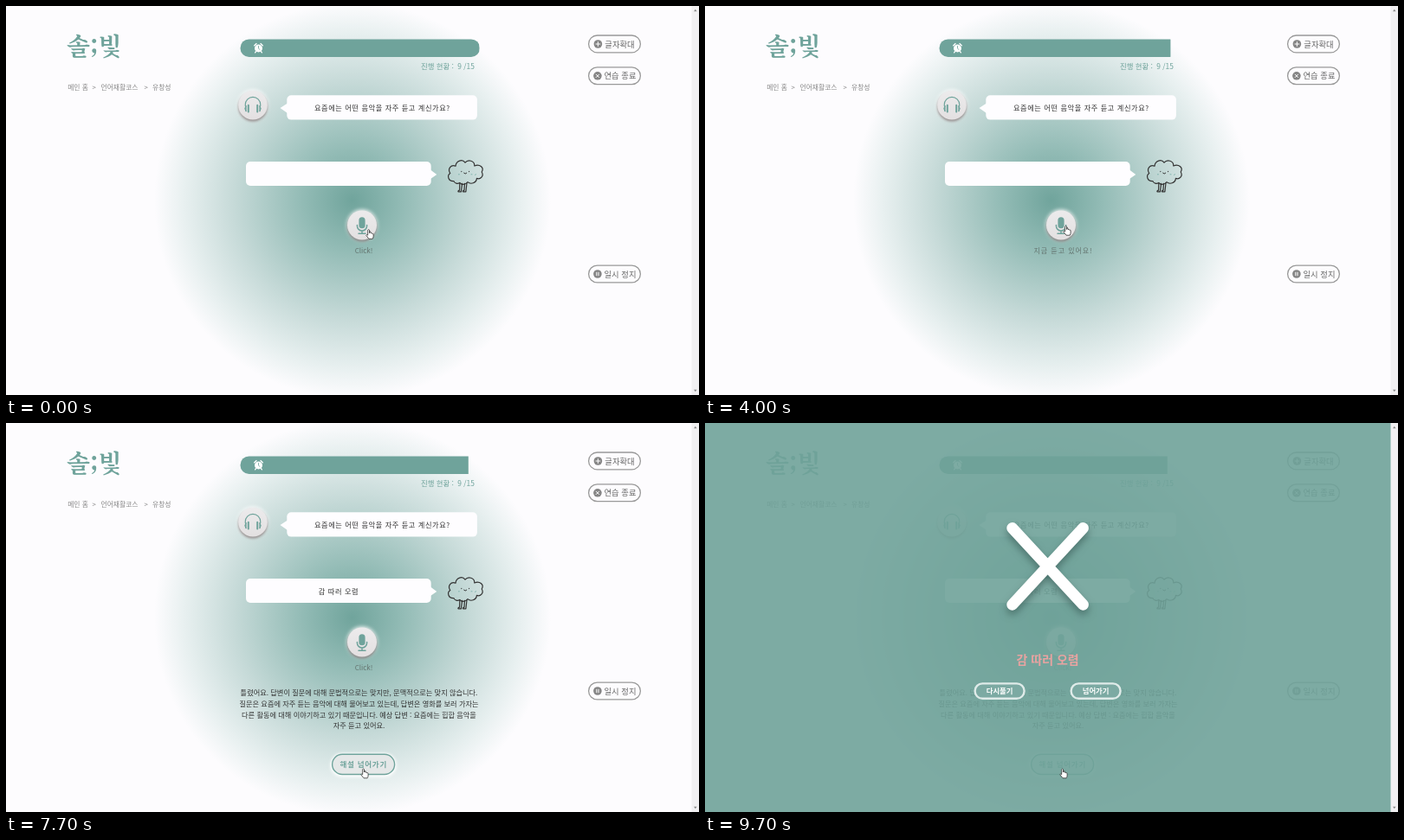
An HTML page that plays this animation: 800 by 450 pixels, repeating every 9.8 s.

```html
<!DOCTYPE html>
<html lang="ko">
<head>
<meta charset="utf-8">
<title>연습</title>
<style>
html, body { margin: 0; width: 100%; height: 100%; overflow: hidden; background: #fdfcfe; }
svg { display: block; width: 800px; height: 450px; }
text { font: 8.2px "Noto Sans CJK KR", "Noto Sans CJK", "Noto Sans KR", sans-serif; fill: #333; }
.mid { text-anchor: middle; }
.wide { letter-spacing: .58px; }
.logo { font: 700 28px "Noto Serif CJK KR", "Noto Serif KR", "Noto Sans CJK KR", serif; fill: #6fa39b; }
.crumb text { font-size: 7.8px; fill: #888; }
.count text { font-size: 8.4px; fill: #6fa39b; }
.side text { font-size: 9.35px; fill: #666; }
.side rect { fill: #fdfcfe; stroke: #999; stroke-width: 1.3; }
.hint { font-size: 8px; fill: #647570; }
.skip { font-size: 8.5px; font-weight: 700; letter-spacing: .75px; fill: #6fa39b; }
.wrong { font-size: 14px; font-weight: 700; fill: #e9a3a1; }
.choice text { font-size: 8.4px; font-weight: 700; fill: #fff; }
.choice rect { fill: #7caaa3; stroke: #dfebe9; stroke-width: 2.4; }
.line { fill: none; stroke-linecap: round; stroke-linejoin: round; }
.raised { filter: drop-shadow(0 2px 1.4px rgba(112, 98, 98, .7)) drop-shadow(0 -1px 2px rgba(255, 255, 255, .9)); }
.glow { filter: drop-shadow(0 1px 2px #fff) drop-shadow(0 0 1px #fff); }
#cross { filter: drop-shadow(0 5px 4px rgba(40, 70, 65, .5)); }
</style>
</head>
<body>
<svg viewBox="0 0 800 450">
  <defs>
    <radialGradient id="halo">
      <stop offset="0" stop-color="#70a49c"/>
      <stop offset=".25" stop-color="#92bbb5"/>
      <stop offset=".6" stop-color="#c6dad8"/>
      <stop offset=".85" stop-color="#e8f0f0"/>
      <stop offset="1" stop-color="#fdfcfe"/>
    </radialGradient>
    <linearGradient id="knob" x2="0" y2="1">
      <stop offset="0" stop-color="#ecebec"/>
      <stop offset="1" stop-color="#e3e0e1"/>
    </linearGradient>
    <clipPath id="track"><rect x="270.5" y="38.4" width="276.5" height="20.6" rx="10"/></clipPath>
  </defs>

  <rect width="800" height="450" fill="#fdfcfe"/>
  <circle cx="400" cy="225" r="229" fill="url(#halo)"/>

  <text class="logo" x="70" y="57">솔;빛</text>
  <g class="crumb">
    <text x="71.2" y="97">메인 홈</text><text x="99.5" y="97">&gt;</text>
    <text x="109.5" y="97">언어재활코스</text><text x="159.5" y="97">&gt;</text>
    <text x="169" y="97">유창성</text>
  </g>

  <rect id="bar" x="270" y="38" width="276" height="22" fill="#6fa39b" clip-path="url(#track)"/>
  <g class="line" stroke="#fff" stroke-width="1.3">
    <path d="M286.7 45.7L289 43.5M296.3 45.7L294 43.5M288.6 52.6L287.6 53.9M294.4 52.6L295.4 53.9"/>
    <circle cx="291.5" cy="48.9" r="4.5" fill="#fff" stroke="none"/>
    <path d="M291.5 46.4V49.1L293 50.4" stroke="#6fa39b" stroke-width=".8"/>
  </g>
  <g class="count"><text x="479" y="73.2">진행 현황 :</text><text x="521.3" y="73.2">9 /15</text></g>

  <g fill="#fefdff">
    <path d="M325 112.5L316.5 118L325 124Z"/>
    <rect x="324.3" y="103.3" width="219.6" height="28.3" rx="5"/>
    <path d="M490 189.5L497.3 195L490 200Z"/>
    <rect x="277" y="180" width="213.7" height="28" rx="5"/>
  </g>
  <text class="wide" x="356" y="121">요즘에는 어떤 음악을 자주 듣고 계신가요?</text>
  <text class="wide" id="answer" x="360.8" y="197.6">감 따러 오렴</text>

  <circle class="raised" cx="285" cy="114.7" r="16.8" fill="url(#knob)"/>
  <g class="line" stroke="#6fa39b">
    <path d="M276.3 115.5V114A8.7 8.7 0 0 1 293.7 114V115.5" stroke-width="1.2"/>
    <path d="M279.8 114.8V122.6M290.2 114.8V122.6" stroke-width="2"/>
    <path d="M276.9 115.6Q274.6 118.7 276.9 121.8ZM293.1 115.6Q295.4 118.7 293.1 121.8Z" fill="#6fa39b"/>
  </g>

  <circle class="raised" cx="411" cy="253.5" r="17" fill="url(#knob)"/>
  <rect x="407.4" y="244.3" width="7.2" height="13" rx="3.6" fill="#6fa39b"/>
  <path class="line" d="M405.4 253.4V254.4A5.6 5.6 0 0 0 416.6 254.4V253.4M411 260V263M407 263.2H415" stroke="#6fa39b" stroke-width="1.5"/>
  <text class="mid hint" id="hint" y="285.6"></text>

  <g class="line" stroke="#333" stroke-width="1.2">
    <path d="M523.8 205L523.6 213.2Q521.4 213.6 522 214.8H525.4L526.6 205.4M529.4 205.4L529 213.2Q526.9 213.6 527.5 214.8H530.9L532 204.8"/>
    <path d="M517 202.6C510.5 203.2 508.8 196 512.8 193.6C509.4 188.6 513.6 183 519 185.2C519.6 178.6 527 176.8 530 181.2C533.6 177 541 179 540.8 185C546.6 182.2 552.4 187 549.2 192C552.2 197 547.4 201 543.4 199.4C543 205 536.4 206.8 533 203.6C530 207.4 525.4 207 523.8 204.4C521.2 206.2 518 205.2 517 202.6Z"/>
    <path d="M525.8 191.3v.4M534.6 191.3v.4M528.6 193.2Q530.2 195.2 531.8 193.2" stroke-width="1"/>
    <path d="M522.4 194.8h1M537 194.8h1M541.5 195.4l1-.7" stroke="#7fb5ad" stroke-width="1"/>
  </g>

  <g class="side">
    <g><rect x="672.6" y="34" width="59.8" height="19.8" rx="9.9"/><text x="691.3" y="47.6">글자확대</text></g>
    <g><rect x="672.6" y="70.8" width="59.8" height="19.8" rx="9.9"/><text x="690.5" y="84.4">연습 종료</text></g>
    <g><rect x="672.6" y="300.1" width="59.8" height="19.8" rx="9.9"/><text x="690.5" y="313.6">일시 정지</text></g>
    <g fill="#858585"><circle cx="683.4" cy="44" r="4.8"/><circle cx="682.9" cy="80.8" r="4.8"/><circle cx="682.9" cy="310" r="4.8"/></g>
    <path class="line" d="M681 44h4.8M683.4 41.6v4.8M681.2 79.1l3.4 3.4M684.6 79.1l-3.4 3.4M681.8 308.2v3.6M684 308.2v3.6" stroke="#fff"/>
  </g>

  <g id="notes">
    <g class="mid">
      <text x="407.5" y="315.3">틀렸어요. 답변이 질문에 대해 문법적으로는 맞지만, 문맥적으로는 맞지 않습니다.</text>
      <text x="407.5" y="327.9">질문은 요즘에 자주 듣는 음악에 대해 물어보고 있는데, 답변은 영화를 보러 가자는</text>
      <text x="407.5" y="340.5">다른 활동에 대해 이야기하고 있기 때문입니다. 예상 답변 : 요즘에는 힙합 음악을</text>
      <text x="407.5" y="353.1">자주 듣고 있어요.</text>
    </g>
    <rect class="glow" x="376.6" y="383.3" width="72" height="23.2" rx="11.6" fill="#e5e8e8" stroke="#6fa39b" stroke-width="1.4"/>
    <text class="mid skip" x="412.7" y="398.1">해설 넘어가기</text>
  </g>

  <g id="sheet">
    <rect width="792" height="450" fill="#6fa29a" fill-opacity=".9"/>
    <path id="cross" class="line" d="M354.8 121.6L436.4 210.2M436.4 121.6L354.8 210.2" stroke="#fff" stroke-width="13"/>
    <text class="mid wrong" x="395.6" y="279.4">감 따러 오렴</text>
    <g class="mid choice">
      <rect x="311.6" y="301.4" width="57" height="17.4" rx="8.7"/><text x="340.1" y="313.2">다시풀기</text>
      <rect x="422.6" y="301.4" width="57" height="17.4" rx="8.7"/><text x="451.1" y="313.2">넘어가기</text>
    </g>
  </g>

  <g id="cursor" stroke="#333" stroke-width=".8" stroke-linejoin="round" fill="#fff">
    <path id="hand" d="M-.9 6.6V.6Q0-.6.9.6V4Q2-.0 2.5 4.2Q3.6 3.4 4 4.7Q5.4 4.1 5.5 5.8V8Q5.4 9.4 4.6 10.8H.4L-2.8 6.8Q-2.4 5.2-.9 6.6Z"/>
    <path id="arrow" d="M0 0V9L2.1 7.1L3.5 10.2L4.8 9.6L3.4 6.6H6.2Z"/>
  </g>

  <rect x="791.5" width="8.5" height="450" fill="#f1f0f2"/>
  <path d="M794 6.2L795.8 3.8L797.6 6.2ZM794 443.8L795.8 446.2L797.6 443.8Z" fill="#8b8b8b"/>
</svg>
<script>
const LOOP = 9800;
const HEARD = 4700, STOP = 5600, NOTES = 6700, SHEET = 9110, RISE = 277;
// time, x, y of the pointer tip
const PATH = [[0, 418.6, 258.6], [500, 418.6, 258.6], [800, 416.6, 254.4], [7100, 416.6, 254.4], [7700, 412.6, 400]];

const $ = id => document.getElementById(id);
const clamp = v => Math.min(1, Math.max(0, v));
const show = (id, on) => $(id).setAttribute('visibility', on ? 'visible' : 'hidden');
const move = (id, x, y) => $(id).setAttribute('transform', `translate(${x} ${y})`);

function pointer(t) {
  let i = 0;
  while (i < PATH.length - 2 && t >= PATH[i + 1][0]) i++;
  const [a, b] = [PATH[i], PATH[i + 1]];
  const p = clamp((t - a[0]) / (b[0] - a[0]));
  const e = p * p * (3 - 2 * p);
  return [a[1] + (b[1] - a[1]) * e, a[2] + (b[2] - a[2]) * e];
}

function setHint(listening) {
  const hint = $('hint');
  hint.textContent = listening ? '지금 듣고 있어요!' : 'Click!';
  hint.setAttribute('x', listening ? 413.6 : 413);
  hint.style.letterSpacing = listening ? '.95px' : '0';
}

function render(t) {
  $('bar').setAttribute('width', 276.5 - Math.min(t, STOP) * 0.00227);
  setHint(t >= 700 && t < HEARD);
  show('answer', t >= HEARD);
  show('notes', t >= NOTES);

  const left = Math.pow(1 - clamp((t - SHEET) / RISE), 4);
  show('sheet', t > SHEET);
  move('sheet', 0, 450 * left);

  const [x, y] = pointer(t);
  const between = y > 271 && y < 383;
  move('cursor', x, y);
  show('hand', !between);
  show('arrow', between);
}

const start = performance.now();
function tick() {
  render((performance.now() - start) % LOOP);
  requestAnimationFrame(tick);
}
tick();
</script>
</body>
</html>
```
